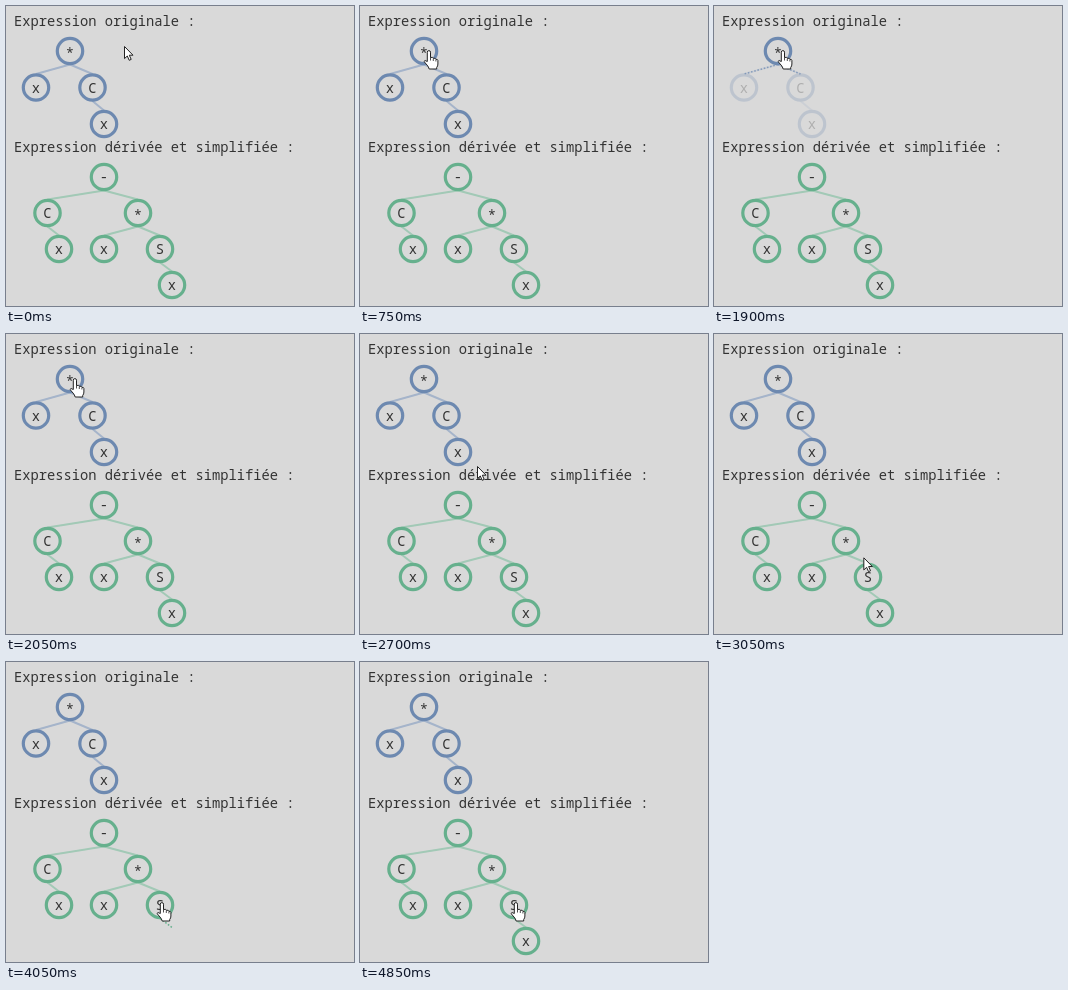
Recreate the animation shown at these times as an HTML page. Size 348 by 300 pixels, loop 4950 ms.

```html
<!DOCTYPE html>
<html lang="fr">
<head>
<meta charset="utf-8">
<title>Arbres d'expression</title>
<style>
  html, body { margin: 0; width: 100%; height: 100%; overflow: hidden; background: #d9d9d9; }
  svg { display: block; width: 348px; height: 300px; }
  text { font: 13.75px "Noto Sans Mono", "DejaVu Sans Mono", monospace; fill: #333; white-space: pre; }
  .label { text-anchor: middle; }
  circle { fill: none; stroke-width: 3.2; }
  .link { fill: none; stroke-width: 2; }
  .dots { fill: none; stroke-width: 1.5; stroke-dasharray: 1.6 1.7; }
  .cursor { fill: #fff; stroke: #222; stroke-width: 1; stroke-linejoin: round; }
</style>
</head>
<body>
<svg viewBox="0 0 348 300">
  <text x="8" y="20">Expression originale :</text>
  <text x="8" y="146">Expression dérivée et simplifiée :</text>
  <g id="trees"></g>
  <g id="cursor" class="cursor">
    <path id="arrow" d="M.5 .5V12.6L3.3 10L5.2 14.3L7.2 13.4L5.3 9.2H9z"/>
    <g id="hand">
      <path d="M-1.7 10V1.2a1.6 1.6 0 0 1 3.2 0V6.5q2.6-.8 2.8.8q2.3-.6 2.6 1q1.8-.3 2 1.2V13q0 2-1.2 3.5V18H.2q-.5-2-2.2-4l-3-3.5q.5-2 3.3 0z"/>
      <path d="M1.5 6.5V9.5M4.3 7.5V10M6.9 8.5V10.5" stroke-width=".8"/>
    </g>
  </g>
</svg>
<script>
const LOOP = 4950, STEP = 50;
const $ = id => document.getElementById(id);

const blue = { ring: '#6d89b0', link: '#a5b4ca' };
const green = { ring: '#66b08d', link: '#a2c9b6' };

// Each node: label, centre, children; "fold" names the branch that collapses.
const blueTree = { label: '*', x: 64, y: 45, fold: 'product', kids: [
  { label: 'x', x: 30, y: 81.5 },
  { label: 'C', x: 86.5, y: 81.5, kids: [{ label: 'x', x: 98, y: 118 }] }
] };
const greenTree = { label: '-', x: 98, y: 171, kids: [
  { label: 'C', x: 41.5, y: 207, kids: [{ label: 'x', x: 53, y: 243 }] },
  { label: '*', x: 132, y: 207, kids: [
    { label: 'x', x: 98, y: 243 },
    { label: 'S', x: 154, y: 243, fold: 'sine', kids: [{ label: 'x', x: 166, y: 279 }] }
  ] }
] };

// Fold times: [hide start, hide end, show start, show end]
const folds = {
  product: { times: [750, 1050, 1850, 2050], open: [], closed: [] },
  sine: { times: [3700, 4000, 4600, 4800], open: [], closed: [] }
};

// Cursor hotspot: [time, x, y]
const path = [
  [0, 118, 40], [150, 100, 41], [250, 80, 43], [350, 69, 45], [2400, 69, 45],
  [2550, 89, 80], [2700, 117, 132], [2850, 136, 184], [2950, 144, 206],
  [3100, 152, 232], [3250, 156, 241], [LOOP, 156, 241]
];

const nodes = [];

function add(parent, tag, attrs, text) {
  const el = document.createElementNS('http://www.w3.org/2000/svg', tag);
  for (const key in attrs) el.setAttribute(key, attrs[key]);
  if (text) el.textContent = text;
  return parent.appendChild(el);
}

function drawNode(node, colors, layer) {
  nodes.push(node);
  const fold = folds[node.fold];
  const branch = fold ? add(layer, 'g') : layer;
  if (fold) fold.open.push(branch);
  for (const kid of node.kids || []) {
    const d = `M${node.x} ${node.y + 13.5}L${kid.x} ${kid.y - 13.5}`;
    add(branch, 'path', { d, class: 'link', stroke: colors.link });
    if (fold) fold.closed.push(add(layer, 'path', { d, class: 'dots', stroke: colors.ring }));
    drawNode(kid, colors, branch);
  }
  add(layer, 'circle', { cx: node.x, cy: node.y, r: 12.7, stroke: colors.ring });
  const baseline = node.y + (node.label === '*' ? 6.5 : 5);
  add(layer, 'text', { x: node.x, y: baseline, class: 'label' }, node.label);
}

const progress = (t, a, b) => Math.min(1, Math.max(0, (t - a) / (b - a)));

function cursorAt(t) {
  const i = path.findIndex(key => key[0] > t);
  const [t0, x0, y0] = path[i - 1], [t1, x1, y1] = path[i];
  const p = progress(t, t0, t1);
  return [x0 + (x1 - x0) * p, y0 + (y1 - y0) * p];
}

function render(t) {
  for (const { times: [a, b, c, d], open, closed } of Object.values(folds)) {
    const hidden = progress(t, a, b) - progress(t, c, d);
    open.forEach(el => el.setAttribute('opacity', 1 - hidden));
    closed.forEach(el => el.setAttribute('opacity', hidden));
  }
  const [x, y] = cursorAt(t);
  const hover = nodes.some(n => Math.hypot(n.x - x, n.y - y) < 14.3);
  $('cursor').setAttribute('transform', `translate(${x} ${y})`);
  $('arrow').setAttribute('visibility', hover ? 'hidden' : 'visible');
  $('hand').setAttribute('visibility', hover ? 'visible' : 'hidden');
}

drawNode(blueTree, blue, $('trees'));
drawNode(greenTree, green, $('trees'));

const start = performance.now();
function tick() {
  const t = (performance.now() - start) % LOOP;
  render(Math.floor(t / STEP) * STEP);
  requestAnimationFrame(tick);
}
tick();
</script>
</body>
</html>
```
